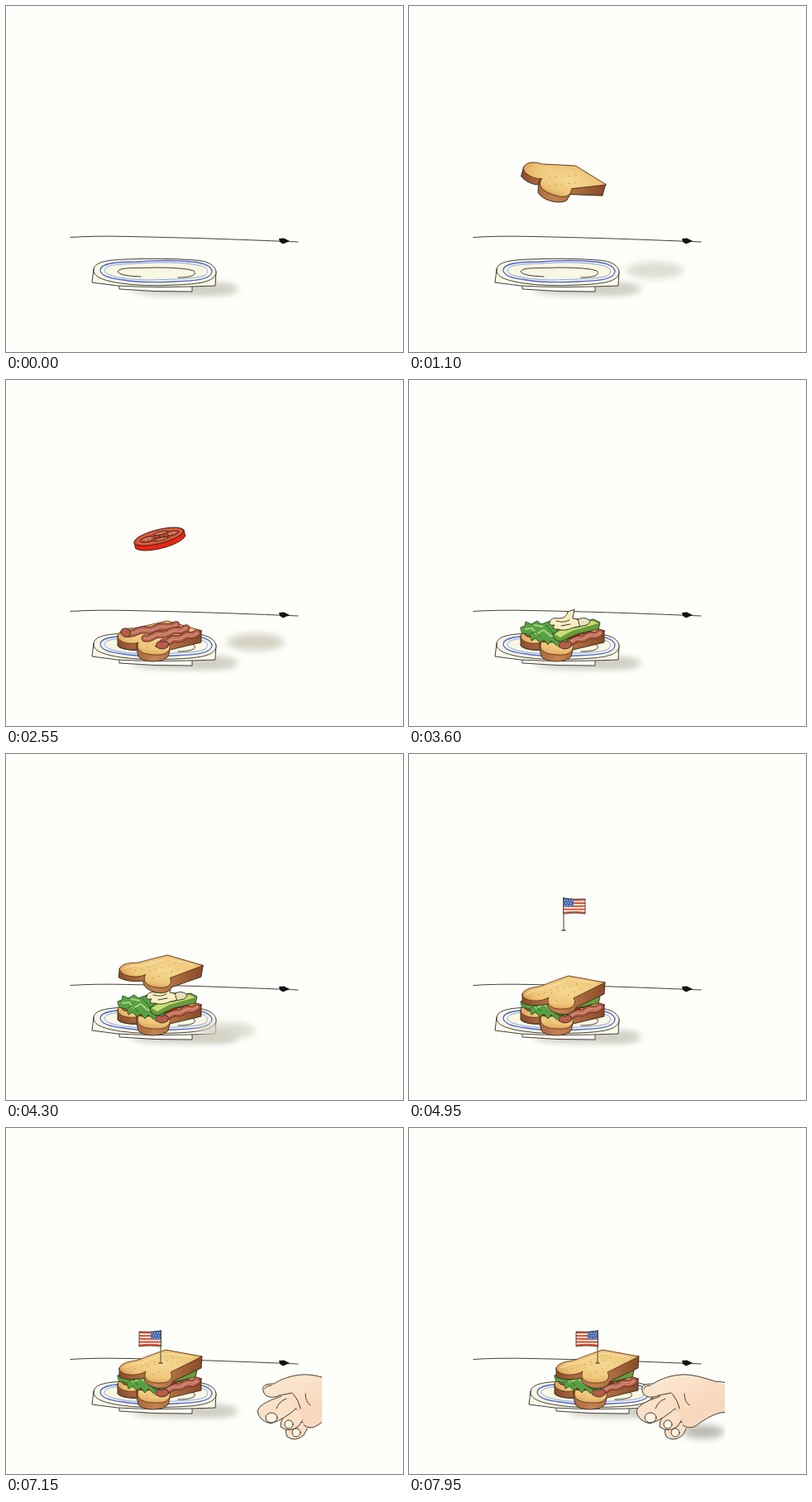
Recreate the animation shown at these times as an HTML page. Size 480 by 418 pixels, loop 8000 ms.

```html
<!DOCTYPE html>
<html lang="en">
<head>
<meta charset="utf-8">
<title>Sandwich</title>
<style>
  html, body { margin: 0; width: 100%; height: 100%; overflow: hidden; background: #fefefb; }
  svg { display: block; width: 100%; height: 100%; }
  .ink { stroke: #302b20; stroke-width: .9; stroke-linejoin: round; stroke-linecap: round; }
  .line { fill: none; }
</style>
</head>
<body>
<svg viewBox="0 0 480 418" preserveAspectRatio="xMidYMid meet">
  <defs>
    <filter id="blur" x="-50%" y="-100%" width="200%" height="300%"><feGaussianBlur stdDeviation="4"/></filter>
    <radialGradient id="crumb" cx=".55" cy=".45" r=".62">
      <stop offset="0" stop-color="#f5d991"/><stop offset=".65" stop-color="#eec67a"/><stop offset="1" stop-color="#d89a55"/>
    </radialGradient>
    <linearGradient id="crust" x1="0" x2="1">
      <stop offset="0" stop-color="#8d4c2c"/><stop offset=".45" stop-color="#c48350"/><stop offset="1" stop-color="#8a4a28"/>
    </linearGradient>
    <linearGradient id="skin" x1="0" y1="0" x2="1" y2="1">
      <stop offset="0" stop-color="#fdebd5"/><stop offset=".55" stop-color="#f8d6bb"/><stop offset="1" stop-color="#fbe6d6"/>
    </linearGradient>
    <clipPath id="sleeve"><rect width="382" height="418"/></clipPath>
  </defs>

  <path class="ink line" d="M78 279.500Q105 277.500 150 278.500T230 280.500T353 285"/>
  <path fill="#111" d="M330 281L336 280.500L343 284L335 287.500L331 285Z"/>

  <g id="meal">
    <ellipse cx="215" cy="343" rx="64" ry="6" fill="#c6c6ba" filter="url(#blur)"/>
    <ellipse cx="253" cy="341" rx="27" ry="6" fill="#d0d0c4" filter="url(#blur)"/>
    <path class="ink" fill="#fffffb" d="M137 337V342L180 344.500L225 345V337Z"/>
    <path class="ink" fill="#fbfaec" d="M106 318L104 334L135 338Q180 341 253 338L254 321Z"/>
    <path class="ink" fill="#f8f7e3" d="M106 319C106 309 122 307 145 306Q190 304 229 307C245 308 254 314 254 322C253 334 230 336 205 337Q165 339 139 335C118 332 105 327 106 319Z"/>
    <g class="line" stroke="#4c66d0">
      <path stroke-width="1.300" d="M114 319C114 311 132 309 158 309Q195 306 224 309C240 310 249 315 249 321C248 331 227 332 204 333Q165 335 142 331C124 329 114 325 114 319Z"/>
      <path stroke="#8b9fe4" d="M119 319C121 311 145 312 177 310Q213 309 231 313C244 315 246 320 241 325C233 330 198 330 176 331C139 331 118 325 119 319Z"/>
    </g>
    <path class="ink line" d="M163 327Q137 326 135 321C137 315 159 317 181 316Q218 316 227 320C232 325 223 328 208 328"/>

    <g id="base">
      <path class="ink" fill="url(#crust)" d="M135 309V321C142 326 152 327 158 325L160 334C166 342 189 342 196 334L198 326L236 317V303Z"/>
      <path class="ink" style="stroke:#613515" fill="url(#crumb)" d="M135 310C135 302 148 299 155 300L195 291L237 303L198 319C200 329 191 333 180 332C166 332 156 327 160 317C152 320 136 318 135 310Z"/>
      <path class="line" stroke="#6a391c" stroke-width="1.500" d="M158 318V325"/>
      <path class="line" stroke="#b4712e" stroke-dasharray="1 7" d="M168 313L205 300M170 323L213 306"/>
    </g>

    <g id="bacon">
      <g id="strips"></g>
      <path class="ink" fill="#b85c48" d="M181 322Q182 314 189 316Q198 314 196 322Q189 328 181 322Z"/>
      <path class="ink" fill="#b85c48" d="M139 306Q138 299 146 300Q153 303 149 310Q142 312 139 306Z"/>
    </g>

    <g id="tomato">
      <g transform="rotate(-14 185 300)">
        <path class="ink" fill="#ed2412" d="M154 300V307C162 317 207 317 216 307V300Z"/>
        <ellipse class="ink" cx="185" cy="300" rx="31" ry="8.500" fill="#d6472c"/>
        <ellipse cx="185" cy="300" rx="27" ry="6" fill="#bd4630" stroke="#ed7251"/>
        <g class="ink" fill="#e07a54">
          <ellipse cx="171" cy="300" rx="8" ry="3"/><ellipse cx="188" cy="296.500" rx="9" ry="1.800"/>
          <ellipse cx="202" cy="300" rx="7" ry="2.500"/><ellipse cx="187" cy="303.500" rx="9" ry="1.700"/>
        </g>
        <path class="line" stroke="#601d14" stroke-dasharray="2 3" d="M165 301H210M180 297L194 304"/>
      </g>
    </g>

    <g id="greens">
      <path class="ink" style="stroke:#24501e" fill="#58a044" d="M135 299L140 297L141 292L148 295L155 291L160 295L171 291L181 302L193 311L189 317L183 315L179 321L172 315L168 320L163 314L158 317L153 312L148 315L146 308L137 306Z"/>
      <path class="line" stroke="#a8d575" stroke-width="2" d="M140 301L149 300L154 307L163 302L171 309L182 309M151 296L162 298"/>
      <path class="line" stroke="#276d24" d="M147 307L152 304L160 311M165 296L172 303L180 313"/>
      <path class="ink" fill="#699c3b" d="M174 307L187 297L223 289L231 293L229 301L203 307L184 316Q174 315 174 307Z"/>
      <path fill="#c8dd76" d="M176 307Q191 296 222 291L229 294L197 303L183 311Z"/>
      <path class="ink" fill="#e8e3bd" d="M201 292Q207 286 214 288Q223 291 215 296L201 299Z"/>
      <path class="ink" fill="#f7efc2" d="M170 293Q171 286 182 288Q190 288 192 280L200 277L198 288Q207 289 205 294Q210 298 199 299Q188 304 180 301Q171 302 176 296Q168 297 170 293Z"/>
      <path class="ink line" d="M178 291Q187 294 194 290M184 297L195 295"/>
    </g>

    <g id="lid">
      <path class="ink" fill="url(#crust)" d="M137 290V301C146 305 159 304 167 302C167 311 181 316 192 314C199 312 201 309 202 306L236 290L237 276Z"/>
      <path class="ink" style="stroke:#613515" fill="url(#crumb)" d="M137 291C137 285 147 282 157 281C164 279 167 277 193 268L237 276L199 295C203 302 198 308 187 308C174 309 165 304 169 294C160 300 140 300 137 291Z"/>
      <path class="line" stroke="#fae6ad" stroke-width="1.500" opacity=".7" d="M142 290Q150 285 163 284L193 272L226 277"/>
      <path class="line" stroke="#b4712e" stroke-dasharray="1 7" d="M172 289L205 277M178 298L213 281M156 291L186 280"/>
    </g>

    <g id="flag">
      <ellipse cx="187" cy="284" rx="3" ry="1" fill="#8a5520"/>
      <path class="line" stroke="#77754f" stroke-width="1.400" d="M187 244V285"/>
      <g id="cloth">
        <path fill="#fff8e8" d="M0 244Q13 246 26 245V263Q14 261 0 263Z"/>
        <path class="line" stroke="#d9452d" stroke-width="1.800" d="M0 245.500Q13 247 26 246M0 249.500Q13 250.500 26 250M0 253.500Q13 254 26 253.500M0 257.500H26M0 261.500Q13 260 26 261.500"/>
        <path fill="#486aae" d="M0 244L12 245.500V254.500H0Z"/>
        <path class="line" stroke="#e6edfa" stroke-dasharray="1 2" d="M1 247H11M2 250H11M1 253H11"/>
        <path class="ink line" style="stroke-width:.8" d="M0 244Q13 246 26 245V263Q14 261 0 263Z"/>
      </g>
    </g>
  </g>

  <ellipse id="shade" rx="35" ry="10" fill="#d3d2c2" filter="url(#blur)"/>

  <g clip-path="url(#sleeve)">
    <ellipse id="handShade" cx="356" cy="367" rx="25" ry="8" fill="#b9b9b0" filter="url(#blur)"/>
    <g id="hand">
      <g class="ink" fill="#fbe0c8">
        <path d="M316 353Q306 364 311 373Q321 380 331 371L338 358Z"/>
        <path d="M318 338Q302 349 303 361Q314 369 325 360L334 346Z"/>
        <path d="M304 324Q276 333 275 342Q277 354 291 357Q307 353 326 335L320 322Z"/>
      </g>
      <g class="ink" fill="#fff5e4">
        <ellipse cx="292" cy="350" rx="7" ry="6"/>
        <ellipse cx="313" cy="358" rx="5" ry="5"/>
        <ellipse cx="322" cy="368" rx="5" ry="5"/>
      </g>
      <path fill="url(#skin)" d="M282 317C280 310 287 309 295 309C306 302 317 299 329 298C342 297 357 302 370 306L386 311L440 314V340L376 344Q361 349 352 356Q342 364 333 363L327 344L314 331L302 323C294 327 283 326 282 317Z"/>
      <path class="ink line" d="M302 323C294 327 283 326 282 317C280 310 287 309 295 309C306 302 317 299 329 298C342 297 357 302 370 306L440 314M302 323L317 320M318 321Q325 329 327 339M333 321Q333 331 339 335M310 327Q301 330 298 339M331 359Q339 365 348 359Q362 348 376 344L440 340"/>
      <path class="ink line" d="M284 315Q285 311 292 311"/>
    </g>
  </g>
</svg>
<script>
  const LOOP = 8000, STEP = 50, FALL = 780;
  const get = id => document.getElementById(id);
  const clamp = v => Math.max(0, Math.min(1, v));
  const span = (t, from, to) => clamp((t - from) / (to - from));

  // start time, drop height, tilt, pivot, shadow strength
  const items = [
    { id: 'base', at: 495, drop: 255, tilt: 20, pivot: [185, 316], shade: .75 },
    { id: 'bacon', at: 1235, drop: 250, tilt: 8, pivot: [187, 307], shade: .75 },
    { id: 'tomato', at: 1970, drop: 248, tilt: 0, pivot: [185, 300], shade: 1 },
    { id: 'greens', at: 2720, drop: 250, tilt: 0, pivot: [183, 300], shade: .9 },
    { id: 'lid', at: 3565, drop: 230, tilt: 20, pivot: [187, 291], shade: .75 },
    { id: 'flag', at: 4320, drop: 204, tilt: 0, pivot: [187, 264], shade: 0 }
  ];

  function drawStrip(x1, y1, x2, y2) {
    const points = Array.from({ length: 25 }, (_, i) => {
      const k = i / 24, wave = Math.sin(k * 16);
      return `${x1 + (x2 - x1) * k},${y1 + (y2 - y1) * k + wave}`;
    }).join(' ');
    return [['#512b20', 9], ['#b85c48', 7.5], ['#e8b59c', 2.4], ['#8e3f30', .8]].map(([color, width]) =>
      `<polyline points="${points}" fill="none" stroke="${color}" stroke-width="${width}" stroke-linecap="round" stroke-linejoin="round"/>`
    ).join('');
  }
  get('strips').innerHTML = drawStrip(146, 306, 206, 296) + drawStrip(168, 312, 218, 300) + drawStrip(190, 317, 231, 306);

  function render(t) {
    const shade = get('shade');
    shade.setAttribute('opacity', 0);
    for (const { id, at, drop, tilt, pivot, shade: strength } of items) {
      const k = span(t, at, at + FALL), left = 1 - k * k;
      const alpha = clamp((k - .08) / .4);
      const node = get(id);
      node.setAttribute('opacity', alpha);
      node.setAttribute('transform', `translate(0 ${-drop * left}) rotate(${tilt * (1 - k ** 6)} ${pivot})`);
      if (k > 0 && k < 1) {
        shade.setAttribute('cx', 255 + 105 * left);
        shade.setAttribute('cy', 340 - 52 * left);
        shade.setAttribute('opacity', alpha * strength);
      }
    }

    const spin = 1 - (1 - span(t, 5110, 6200)) ** 2;
    get('cloth').setAttribute('transform', `translate(187 1) scale(${Math.cos(3 * Math.PI * spin)} 1)`);

    const pull = 41 * span(t, 7650, 7950) ** 1.3;
    const reach = 161 * (1 - span(t, 6500, 7650));
    get('meal').setAttribute('transform', `translate(${pull} 0)`);
    get('hand').setAttribute('transform', `translate(${reach - 41 + pull} 0)`);
    get('hand').setAttribute('opacity', span(t, 6450, 6800));
    get('handShade').setAttribute('opacity', span(t, 7200, 7700));
  }

  const start = performance.now();
  function frame() {
    const t = (performance.now() - start) % LOOP;
    render(Math.floor(t / STEP) * STEP);
    requestAnimationFrame(frame);
  }
  frame();
</script>
</body>
</html>
```
